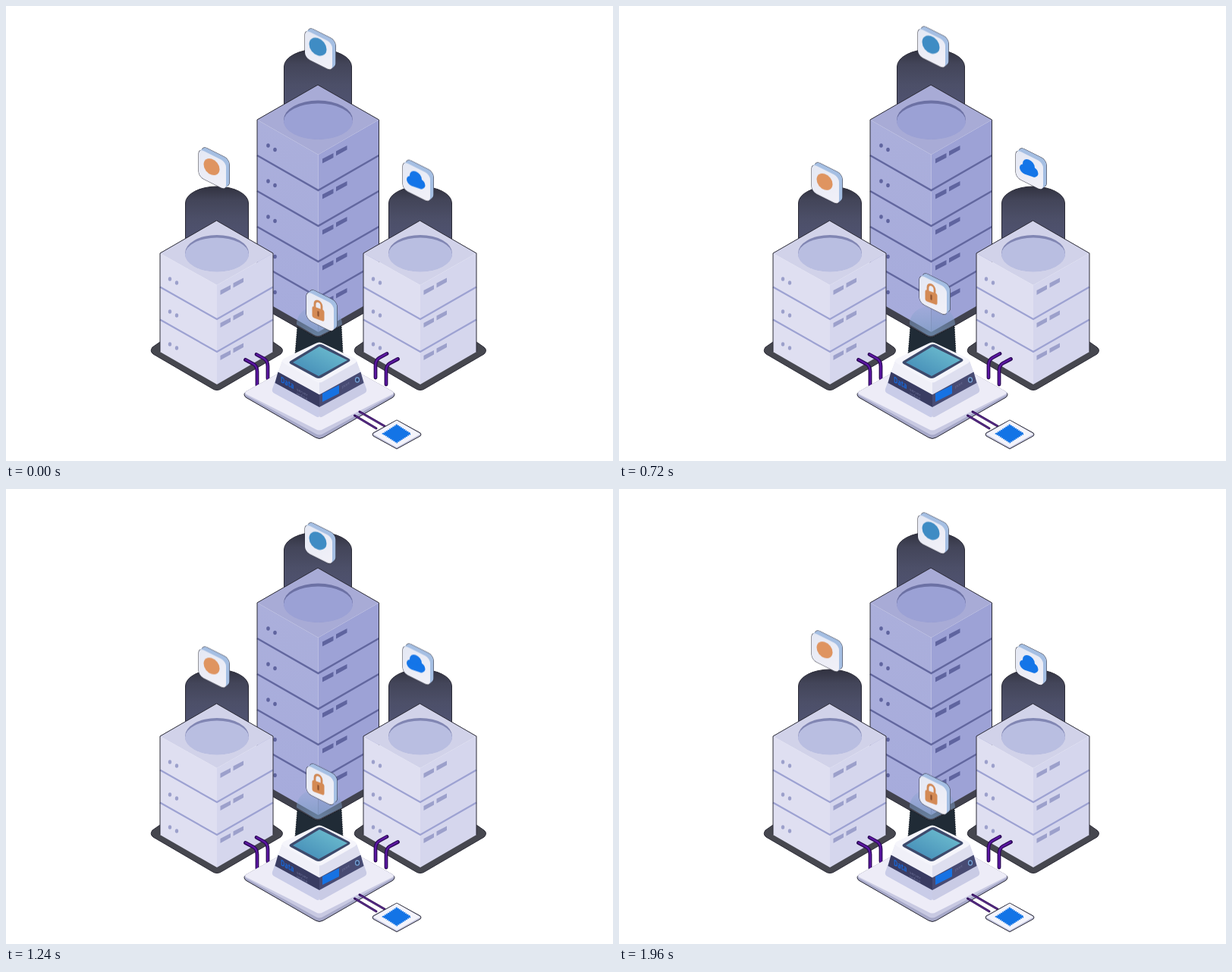
An HTML page without scripts that plays this animation: 800x600 px, repeating every 2000 ms.

```html
<!DOCTYPE html>
<html lang="en">
<head>
<meta charset="utf-8">
<title>Server towers</title>
<style>
html, body { margin: 0; width: 100%; height: 100%; overflow: hidden; background: #fff; }
svg { display: block; width: 100vw; height: 100vh; }
.edge { stroke: #2a2a36; stroke-width: 1; stroke-linejoin: round; }
.bob { animation: bob 1s cubic-bezier(.364, 0, .636, 1) infinite alternate; }
.top { animation-delay: -1.6s; }
.left { animation-delay: -1.99s; }
.right { animation-delay: -1.39s; }
.front { animation-delay: -1.2s; }
@keyframes bob {
  from { transform: translateY(-12.2px); }
  to { transform: translateY(12.2px); }
}
.label { font: 700 11px "Open Sans", sans-serif; fill: #1768dc; }
.fine { font: 5px "Open Sans", sans-serif; fill: #70749a; }
</style>
</head>
<body>
<svg viewBox="0 0 800 600">
<defs>
  <linearGradient id="beam" x2="0" y2="1">
    <stop offset="0" stop-color="#313240"/>
    <stop offset=".25" stop-color="#434559"/>
    <stop offset=".6" stop-color="#4c4f68"/>
    <stop offset="1" stop-color="#505372"/>
  </linearGradient>
  <linearGradient id="glow" x2="0" y2="1">
    <stop offset="0" stop-color="#86a3d0" stop-opacity=".2"/>
    <stop offset="1" stop-color="#7597bd" stop-opacity=".75"/>
  </linearGradient>
  <linearGradient id="screen" x1="0" y1="1" x2="1" y2="0">
    <stop offset="0" stop-color="#3f86b4"/>
    <stop offset="1" stop-color="#72c3d2"/>
  </linearGradient>
  <linearGradient id="card" x2="1" y2="1">
    <stop offset="0" stop-color="#e4e8f4"/>
    <stop offset="1" stop-color="#f2f1f8"/>
  </linearGradient>
  <linearGradient id="bigLeft" x2="0" y2="1">
    <stop offset="0" stop-color="#abafdb"/>
    <stop offset="1" stop-color="#a6abdc"/>
  </linearGradient>

  <!-- one storey of each tower: dots, slots -->
  <g id="bigUnit" fill="#5f649f">
    <ellipse cx="345.5" cy="184" rx="2.3" ry="2.8"/>
    <ellipse cx="354.5" cy="189.5" rx="2.3" ry="2.8"/>
    <path d="M417 201.500L431.500 194V200L417 207.500ZM435 191.500L449.500 184V189.500L435 197.500Z"/>
  </g>
  <path id="bigSeam" d="M331 197L411.500 243L491.500 197" fill="none" stroke="#62679f" stroke-width="2.4"/>
  <g id="unit" fill="#9ca0cb">
    <ellipse cx="216" cy="360" rx="2.2" ry="2.7"/>
    <ellipse cx="225" cy="365" rx="2.2" ry="2.7"/>
    <path d="M282.500 375L296 368V373.500L282.500 381ZM299.500 365.500L313 358.500V364L299.500 371.500Z"/>
  </g>
  <path id="seam" d="M203 370.500L278 413L352 370.500" fill="none" stroke="#9da2d2" stroke-width="2.2"/>

  <g id="tower">
    <path class="edge" d="M236.500 310V260A41.500 22 0 0 1 319.500 260V310Z" fill="url(#beam)"/>
    <path class="edge" d="M203 443L193 450Q189 455 194 459L271 504Q278 509 285 504L362 459Q367 454 362 450L352 443Z" fill="#46474f"/>
    <path d="M203 326L278 368V499L203 456Z" fill="#dfdff1"/>
    <path d="M352 326L278 368V499L352 456Z" fill="#d5d6ed"/>
    <path d="M203 326L277.500 283L352 326L278 368Z" fill="#d1d2e9"/>
    <ellipse cx="278" cy="326" rx="42" ry="24" fill="#8186b3"/>
    <path d="M236 327.500A42 22 0 0 1 320 327.500A42 23 0 0 1 236 327.500Z" fill="#b9bee1"/>
    <use href="#unit"/><use href="#unit" y="43"/><use href="#unit" y="86"/>
    <use href="#seam"/><use href="#seam" y="43"/>
    <path class="edge" d="M203 456V326L277.500 283L352 326V456" fill="none"/>
  </g>

  <g id="cables" fill="none" stroke-linecap="round">
    <path d="M315.500 466.500L326 472Q331 475 331 482V500M330 459.500L340 465Q345 468 345 475V491" stroke="#2c0a58" stroke-width="4.8"/>
    <path d="M316 466.500L326 472Q331 475 331 482V500M330.500 459.500L340 465Q345 468 345 475V491" stroke="#5d17a4" stroke-width="2.2"/>
  </g>

  <rect id="face" width="36" height="37" rx="6.500" transform="matrix(1 .5 0 1 0 2.800)"/>
  <g id="tile">
    <g fill="#a5bfe3">
      <use href="#face" class="edge" x="4.300" y="-3.500"/>
      <use href="#face" class="edge"/>
      <use href="#face" x="3.300" y="-2.600"/>
      <use href="#face" x="2.200" y="-1.700"/>
      <use href="#face" x="1.100" y="-.9"/>
      <use href="#face" x="4.300" y="-3.500"/>
    </g>
    <use href="#face" fill="url(#card)"/>
  </g>
</defs>

<!-- tall tower -->
<path class="edge" d="M366.500 135V80A44.500 23 0 0 1 455.500 80V135Z" fill="url(#beam)"/>
<path class="edge" d="M331 380L326 391L405 436Q411 440 417 436L496 391L491 380Z" fill="#41424e"/>
<path d="M331 150L411.500 196V430L331 384Z" fill="url(#bigLeft)"/>
<path d="M491.500 150L411.500 196V430L491.500 384Z" fill="#9da2d6"/>
<path d="M331 150L411 104L491.500 150L411.500 196Z" fill="#a8abd6"/>
<ellipse cx="411.500" cy="150" rx="45.500" ry="25.500" fill="#6c71a4"/>
<path d="M366 152A45.500 23.500 0 0 1 457 152A45.500 24 0 0 1 366 152Z" fill="#9ba1d5"/>
<use href="#bigUnit"/><use href="#bigUnit" y="47"/><use href="#bigUnit" y="94"/>
<use href="#bigUnit" y="141"/><use href="#bigUnit" y="188"/>
<use href="#bigSeam"/><use href="#bigSeam" y="47"/><use href="#bigSeam" y="94"/><use href="#bigSeam" y="141"/>
<path class="edge" d="M331 384V150L411 104L491.500 150V384" fill="none"/>

<use href="#tower"/>
<use href="#tower" x="268"/>

<!-- light under the lock -->
<path d="M384 423L405 435Q411 439 417 435L442 422L444 460H381Z" fill="#202b36" stroke="#10161d" stroke-width=".8" stroke-dasharray="2 1"/>
<path d="M383 420C383 387 443 387 443 420L417 433Q411 437 405 433Z" fill="url(#glow)"/>

<use href="#cables"/>
<use href="#cables" transform="matrix(-1 0 0 1 832 -1)"/>

<!-- control unit -->
<path class="edge" d="M413 455L316 509Q312 512 316 516L408 569Q413 572 418 569L510 516Q514 512 510 509Z" fill="#a6a8c8"/>
<path d="M413 455L316 508.500Q313 511 316 513L408 564Q413 567 418 564L510 513Q513 511 510 508.500Z" fill="#c8c9e2"/>
<path d="M413 454L317 508Q314 510 317 512L408 558Q413 561 418 558L509 512Q512 510 509 508Z" fill="#edecf7"/>
<path d="M364 469L351 505Q350 509 354 511L408 541Q413 544 413 540V494Z" fill="#c9cce8"/>
<path d="M462 469L475 505Q476 509 472 511L418 541Q413 544 413 540V494Z" fill="#c9cbe5"/>
<path d="M364 468L358.500 483L413 513V490Z" fill="#f0f0f8"/>
<path d="M462 468L467.500 483L413 513V490Z" fill="#dedfef"/>
<path d="M358.500 482.500L413 512.500V529L354.500 497Z" fill="#393c62"/>
<path d="M467.500 482.500L413 512.500V529L471.500 497Z" fill="#484b73"/>
<path d="M408 445Q413 442 418 445L460 465Q464 468 460 471L418 495Q413 498 408 495L366 471Q362 468 366 465Z" fill="#f5f5fb"/>
<path d="M410 447Q414 445 418 447L452 465Q455 467 452 469L416 490Q412 492 408 490L375 472Q372 470 375 468Z" fill="#3d4a6c"/>
<path d="M413 449L450 467L412 488L378 470Z" fill="url(#screen)"/>
<text class="label" transform="matrix(.66 .36 0 1 362 496)">Data</text>
<text class="fine" transform="matrix(1 .55 0 1 383 507)">server</text>
<text class="fine" transform="matrix(1 .55 0 1 383 512)">online</text>
<path d="M417 511L439 500V511L417 522Z" fill="#1672e3"/>
<text class="fine" transform="matrix(1 -.55 0 1 443 504)">port</text>
<ellipse cx="463" cy="493" rx="2.500" ry="3.200" fill="#30406b" stroke="#78a6da" stroke-width="1.200"/>

<!-- chip -->
<path d="M459.500 540L488 557M466 535L499 554" stroke="#35105f" stroke-width="3" stroke-linecap="round"/>
<path d="M461 541L488 557M467 536L499 554" stroke="#8250b4" stroke-width=".7"/>
<path class="edge" d="M515 546L484 563Q482 565 484 567L515 584L546 567Q548 565 546 563Z" fill="#c3c5df"/>
<path d="M515 546.500L484 564.500L515 582L546 564.500Z" fill="#f4f4fb"/>
<path d="M515 552.500L497 564L515 575.500L533 564Z" fill="#1374e6" stroke="#1374e6" stroke-width="2" stroke-dasharray="1.500 1"/>

<!-- floating tiles -->
<g transform="translate(394 32)"><g class="bob top">
  <use href="#tile"/>
  <circle r="11.500" transform="matrix(1 .3 0 1 17 25.500)" fill="#3f8cc4"/>
</g></g>
<g transform="translate(254 197.300)"><g class="bob left">
  <use href="#tile"/>
  <circle r="10.500" transform="matrix(1 .3 0 1 17 27)" fill="#df9460"/>
</g></g>
<g transform="translate(523 197.500)"><g class="bob right">
  <use href="#tile"/>
  <g transform="matrix(1 .35 0 1 17 28.500)" fill="#1475e8">
    <circle cx="-6" cy="2.500" r="6"/>
    <circle cx="0" cy="-4" r="8"/>
    <circle cx="6.500" cy="2" r="6"/>
    <rect x="-9" y="0" width="19" height="9" rx="4"/>
  </g>
</g></g>
<g transform="translate(396 363)"><g class="bob front">
  <use href="#tile"/>
  <g transform="matrix(1 .35 0 1 15.500 29.500)">
    <path d="M-4.500 -3V-8A4.500 5 0 0 1 4.500 -8V-3" fill="none" stroke="#d18a58" stroke-width="2.800"/>
    <rect x="-8" y="-4" width="16" height="15" rx="2.500" fill="#d48a55"/>
    <path d="M0 1V6" stroke="#8d5130" stroke-width="2.200" stroke-linecap="round"/>
  </g>
</g></g>
</svg>
</body>
</html>
```
